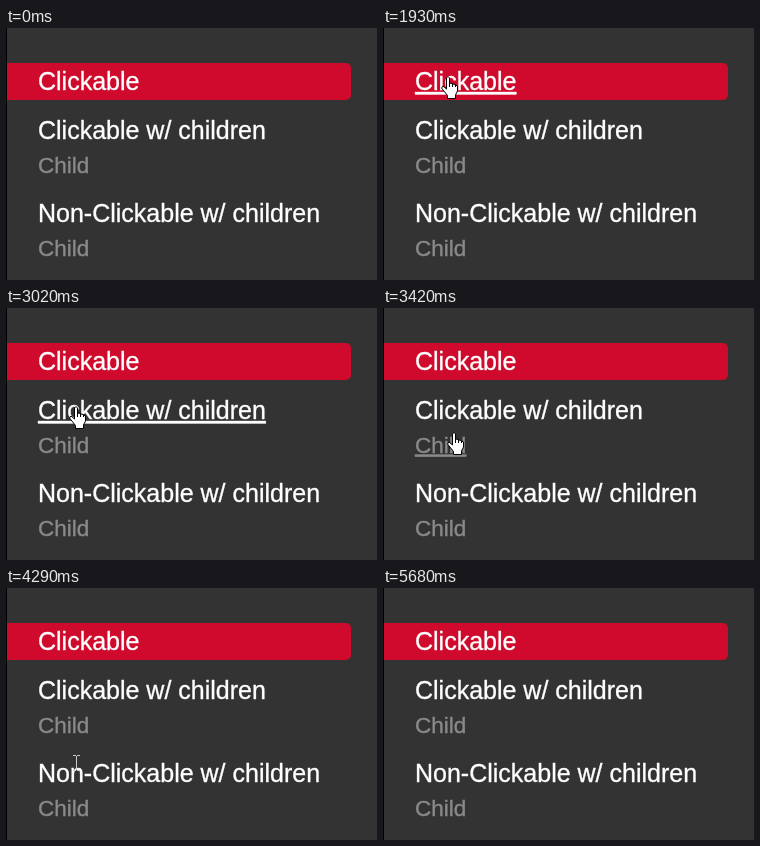
An HTML page that plays this animation: 371x252 px, repeating every 6570 ms.

```html
<!DOCTYPE html>
<html lang="en">
<head>
<meta charset="utf-8">
<title>Menu hover states</title>
<style>
  html, body { margin: 0; width: 100%; height: 100%; overflow: hidden; background: #333; }
  svg { display: block; }
  text { font: 25px Arial, "Liberation Sans", sans-serif; fill: #fff; stroke: #fff; stroke-width: .35; }
  .child { font-size: 22.5px; fill: #8a8a8a; stroke: #8a8a8a; }
  .hover { text-decoration: underline 1px; }
  #cursor path { fill: #fff; stroke: #000; stroke-linejoin: round; }
  #cursor #beam { fill: none; stroke: #ccc; }
</style>
</head>
<body>
<svg width="371" height="252">
  <rect width="1" height="252"/>
  <rect x="-9" y="35" width="354" height="37" rx="5" fill="#cf0a2c"/>
  <rect width="1" height="252"/>
  <g id="menu"></g>
  <g id="cursor">
    <path id="arrow" d="M.5 .5V16.5L4.3 13 6.8 18.6 9.2 17.5 6.8 12H11.8z"/>
    <path id="hand" transform="translate(-5)" d="M5.5 13V2L7 .5 8.5 2V11V7L11.5 7.5V11V8L14.5 8.5V11V9L16.5 10V15L14.5 19V22.5H6.5V19.5L.5 12 2 10z"/>
    <path id="beam" d="M-3-7.5H0M1-7.5H4M.5-7V7M-3 7.5H0M1 7.5H4"/>
  </g>
</svg>
<script>
const LOOP = 6570, ENTER = 1510, LEAVE = 5680;
const LABELS = ['Clickable', 'Clickable w/ children', 'Child', 'Non-Clickable w/ children', 'Child'];
// Pointer moves: start ms, end ms, height reached
const MOVES = [[1510, 1930, 48], [2300, 2960, 95], [2990, 3660, 130], [3660, 3740, 136],
               [3970, 4560, 189], [4650, 5090, 216], [5420, 5680, 270]];
const $ = id => document.getElementById(id);

let base = 13;
const items = LABELS.map(label => {
  const child = label === 'Child';
  base += child ? 34 : 49;
  const text = document.createElementNS('http://www.w3.org/2000/svg', 'text');
  text.textContent = label;
  text.setAttribute('x', 32);
  text.setAttribute('y', child ? base - .5 : base);
  text.classList.toggle('child', child);
  $('menu').append(text);
  return { text, base, link: !label.startsWith('Non') };
});

function pointerY(t) {
  return MOVES.reduce((y, [start, end, to]) => {
    const k = Math.min(1, Math.max(0, (t - start) / (end - start)));
    return y + (to - y) * (1 - (1 - k) ** 1.7);
  }, 2);
}

function draw() {
  const t = performance.now() % LOOP;
  const visible = t >= ENTER && t < LEAVE;
  const y = Math.round(pointerY(t));
  const x = Math.round(70 - 22 * Math.exp(-y / 40));
  let shape = 'arrow';
  for (const { text, base, link } of items) {
    const over = visible && y >= base - 24 && y <= base + 6;
    text.classList.toggle('hover', over && link);
    if (over) shape = link ? 'hand' : 'beam';
  }
  for (const path of $('cursor').children) {
    path.style.display = visible && path.id === shape ? '' : 'none';
  }
  $('cursor').setAttribute('transform', `translate(${x} ${y})`);
  requestAnimationFrame(draw);
}
draw();
</script>
</body>
</html>
```
